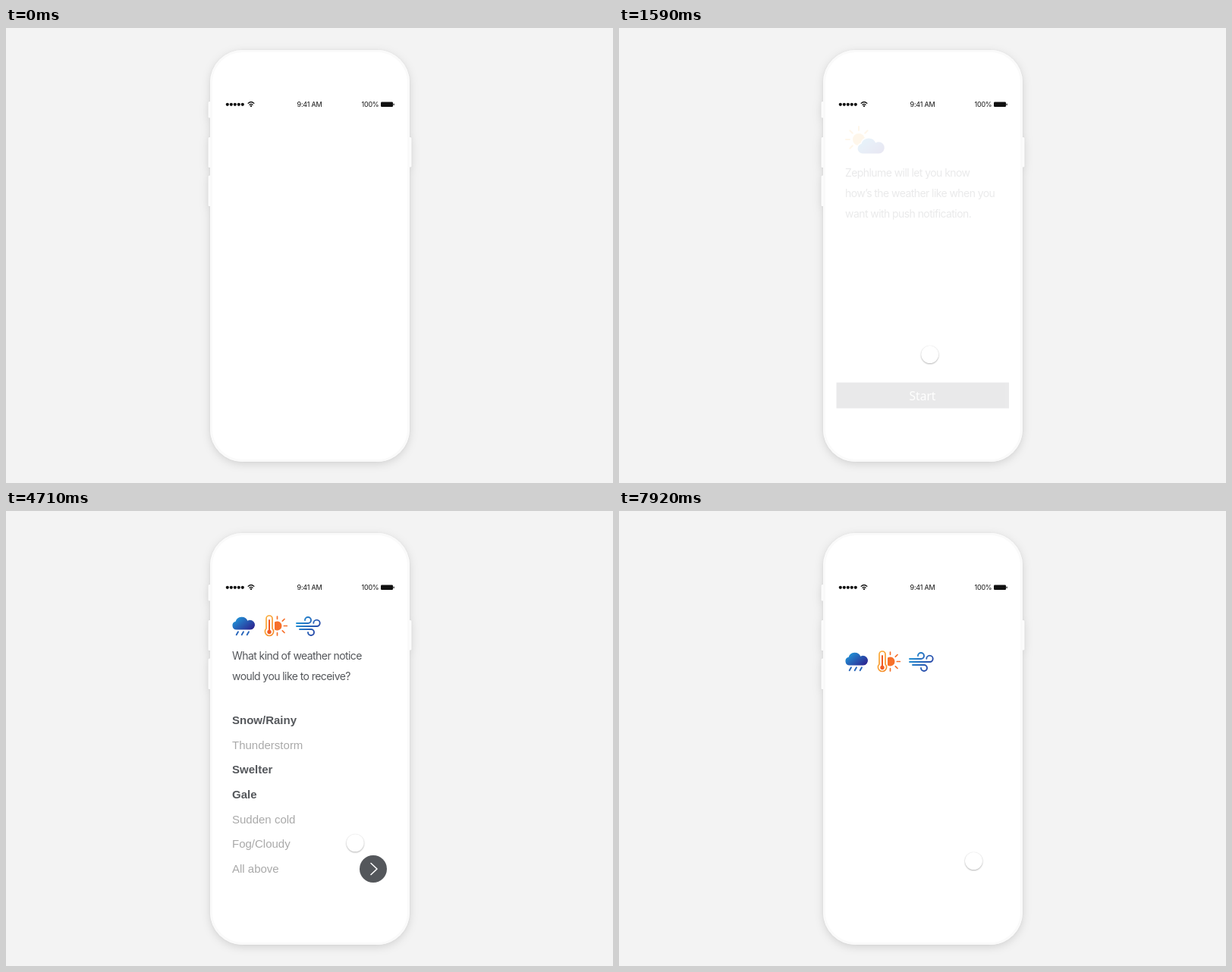
An HTML page that plays this animation: 800x600 px, repeating every 8000 ms.

```html
<!DOCTYPE html>
<html lang="en">
<head>
<meta charset="utf-8">
<title>Weather notice setup</title>
<style>
  html, body { margin: 0; width: 100%; height: 100%; overflow: hidden; background: #f3f3f3; }
  #stage { position: absolute; left: 0; top: 0; width: 800px; height: 600px; overflow: hidden; }
  svg { position: absolute; left: 0; top: 0; }
  text { fill: #34373c; font-family: Inter, sans-serif; }
  .status { font-size: 9px; letter-spacing: -.2px; fill: #111; }
  .copy { font-size: 14px; letter-spacing: -.57px; }
  .option { font: 15px "Liberation Sans", Arial, sans-serif; fill: #999; }
  .day, .dial { font-size: 15px; font-weight: 300; fill: #999; text-anchor: middle; }
  .dial { font-size: 14.5px; }
  .half { font-size: 14px; letter-spacing: -.4px; font-weight: 300; fill: #999; }
  .on { font-weight: 700; fill: #34373c; }
  .start { font: 15.5px "Noto Sans", "Open Sans", sans-serif; fill: #fff; text-anchor: middle; }
  .line { fill: none; stroke-linecap: round; stroke-linejoin: round; }
  #touch {
    position: absolute; left: -11.5px; top: -11.5px; width: 23px; height: 23px; border-radius: 50%;
    background: linear-gradient(rgba(255,255,255,.5), rgba(255,255,255,.32));
    box-shadow: 0 1px 2px rgba(0,0,0,.28), 0 0 1px rgba(0,0,0,.18);
  }
</style>
</head>
<body>
<div id="stage">
<svg width="800" height="600" viewBox="0 0 800 600">
  <defs>
    <linearGradient id="blue" x1="0" y1="0" x2="1" y2=".7">
      <stop offset="0" stop-color="#1fa5e2"/><stop offset="1" stop-color="#2c2a94"/>
    </linearGradient>
    <linearGradient id="breeze" gradientUnits="userSpaceOnUse" x1="383" y1="142" x2="414" y2="162">
      <stop offset="0" stop-color="#2197d8"/><stop offset="1" stop-color="#2b3a9f"/>
    </linearGradient>
    <linearGradient id="heat" x1="0" y1="0" x2="1" y2="1">
      <stop offset="0" stop-color="#fbb03b"/><stop offset="1" stop-color="#f58a2c"/>
    </linearGradient>
    <linearGradient id="fade" x1="0" y1="0" x2="0" y2="1">
      <stop offset="0" stop-color="#fff"/><stop offset=".3" stop-color="#fff" stop-opacity="0"/>
      <stop offset=".7" stop-color="#fff" stop-opacity="0"/><stop offset="1" stop-color="#fff"/>
    </linearGradient>
    <path id="cloud" d="M321 165.5a6.5 6.5 0 0 1-1.5-12.8a10 10 0 0 1 18.8-1.3a7.6 7.6 0 1 1 4 14.1z"/>
    <g id="next">
      <circle cx="484" cy="472" r="18" fill="#34373c"/>
      <path class="line" stroke="#fff" stroke-width="1.6" d="M481 464.5l8 7.5-8 7.5"/>
    </g>
  </defs>

  <g fill="#fcfcfc" style="filter:drop-shadow(0 3px 6px rgba(0,0,0,.13)) drop-shadow(0 0 1px rgba(0,0,0,.06))">
    <rect x="266.5" y="97" width="6" height="21.500" rx="1.5"/>
    <rect x="266.5" y="144" width="6" height="40" rx="1.5"/>
    <rect x="266.5" y="194.500" width="6" height="40.500" rx="1.5"/>
    <rect x="528.5" y="144" width="6" height="39.500" rx="1.5"/>
    <rect x="269" y="29" width="263" height="543" rx="43" fill="#fff"/>
  </g>
  <rect x="270.500" y="30.500" width="260" height="540" rx="41.500" fill="none" stroke="#fafafa" stroke-width="3"/>

  <g id="dots" fill="#111"></g>
  <g class="line" stroke="#111" stroke-width="1.3">
    <path d="M319.2 99.2q3.800-3.400 7.600 0M320.900 101.200q2.100-1.800 4.200 0"/>
    <circle cx="323" cy="102.900" r=".5"/>
  </g>
  <text class="status" x="400" y="104" text-anchor="middle">9:41 AM</text>
  <text class="status" x="491.500" y="104" text-anchor="end">100%</text>
  <rect x="494" y="97.500" width="16" height="6.500" rx="1.200" fill="#111"/>
  <rect x="510.500" y="99.500" width="1.200" height="2.500" rx=".5" fill="#111"/>

  <g id="welcome">
    <circle cx="316" cy="147" r="8" fill="#fbb03b"/>
    <path class="line" stroke="#fbb03b" stroke-width="2"
      d="M316 130v5M304.300 135.300l3.500 3.500M299 147h5M304.300 158.700l3.500-3.500M327.700 135.300l-3.500 3.500"/>
    <use href="#cloud" fill="#fff" stroke="#fff" stroke-width="3"/>
    <use href="#cloud" fill="url(#blue)"/>
    <text class="copy" x="298" y="196">Zephlume will let you know</text>
    <text class="copy" x="298" y="223">how’s the weather like when you</text>
    <text class="copy" x="298" y="250">want with push notification.</text>
    <rect x="286.500" y="467.500" width="227.500" height="34" fill="#34373c"/>
    <text class="start" x="400" y="491">Start</text>
  </g>

  <g id="kinds">
    <text class="copy" x="298" y="196">What kind of weather notice</text>
    <text class="copy" x="298" y="223">would you like to receive?</text>
    <g id="options"></g>
    <use id="kindsNext" href="#next"/>
  </g>

  <g id="schedule">
    <text class="copy" x="298" y="196">Now, choose the time you want</text>
    <text class="copy" x="298" y="223">to be notified.</text>
    <path stroke="#e2e2e2" d="M298 257.500h204M298 383.500h204M298 437.800h204"/>
    <g id="dials"></g>
    <rect x="296" y="273" width="92" height="93" fill="url(#fade)"/>
    <text class="half on" x="442.500" y="324.300">AM</text>
    <text class="half" x="472" y="324">|</text>
    <text class="half" x="481.500" y="324.300">PM</text>
    <g id="days"></g>
    <g class="line" stroke="#34373c" stroke-width="1.6">
      <circle cx="316" cy="472" r="17.200"/>
      <path d="M319 464.500l-8 7.500 8 7.500"/>
    </g>
    <use id="scheduleNext" href="#next"/>
  </g>

  <g id="icons">
    <g>
      <use href="#cloud" fill="url(#blue)" transform="translate(34.200 17.600) scale(.84)"/>
      <path class="line" stroke="#2866bb" stroke-width="1.900" d="M306 159.300l-2.300 4M313 159.300l-2.300 4M320 159.300l-2.300 4"/>
    </g>
    <g>
      <path class="line" stroke="url(#heat)" stroke-width="1.700" d="M343 155v-13a4 4 0 0 1 8 0v13a5.600 5.600 0 1 1-8 0z"/>
      <path class="line" stroke="#f15a24" stroke-width="2" d="M347 144v14"/>
      <circle cx="347" cy="159.500" r="2.700" fill="#f15a24"/>
      <path fill="#f7702a" d="M354 146.600a6 6 0 1 1 0 9.800z"/>
      <path class="line" stroke="#f7702a" stroke-width="1.700"
        d="M357.500 139v3.300M367 142.500l-2.700 2.700M366.300 151.500h4M367 160.500l-2.700-2.700M357.500 160.700v3.300"/>
    </g>
    <path class="line" stroke="url(#breeze)" stroke-width="1.900"
      d="M383 148h15a4 4 0 1 0-4-4M383 152h26.500a4.200 4.200 0 1 0-4.200-4.200M387 156h15a4 4 0 1 1-4 4"/>
  </g>
</svg>
<div id="touch"></div>
</div>

<script>
const LOOP = 8000, STEP = 30, LAST = 7920;
const $ = id => document.getElementById(id);
const clamp = v => Math.min(1, Math.max(0, v));
const progress = (t, from, length) => clamp((t - from) / length);

const linear = p => p;
const outQuad = p => 1 - (1 - p) ** 2;
const inOut = power => p => p < .5 ? (2 * p) ** power / 2 : 1 - (2 - 2 * p) ** power / 2;
const quad = inOut(2), cubic = inOut(3);

function add(parent, tag, attrs, content = '') {
  const el = document.createElementNS('http://www.w3.org/2000/svg', tag);
  for (const name in attrs) el.setAttribute(name, attrs[name]);
  el.textContent = content;
  $(parent).append(el);
  return el;
}

for (let i = 0; i < 5; i++) add('dots', 'circle', { cx: 291.8 + i * 5, cy: 100.8, r: 2.1 });

const options = ['Snow/Rainy', 'Thunderstorm', 'Swelter', 'Gale', 'Sudden cold', 'Fog/Cloudy', 'All above']
  .map((label, i) => add('options', 'text', { class: 'option', x: 298, y: 280.8 + i * 32.7 }, label));

const dayCentres = [305, 335.5, 368, 401.5, 433, 464, 495.5];
const days = [...'MTWTFSS']
  .map((label, i) => add('days', 'text', { class: 'day', x: dayCentres[i], y: 415.3 }, label));

function addDial(x, values) {
  values.forEach((value, i) =>
    add('dials', 'text', { class: i === 2 ? 'dial on' : 'dial', x, y: 289 + i * 17.8 }, value));
}
addDial(308, ['07', '08', '09', '10', '11']);
addDial(374, ['50', '55', '00', '05', '10']);

// Selected item, time of the tap
const picks = [
  [options[0], 2850], [options[2], 3240], [options[3], 3660],
  [days[0], 6060], [days[1], 6360], [days[3], 6720],
];
const iconTimes = [2850, 3240, 3660];

// Page, fade-in start, fade-out start, rise in px
const pages = [
  ['welcome', 240, 1300, 0],
  ['kinds', 1890, 4570, 4],
  ['schedule', 5160, 7400, 4],
];

// Start, length, x, y, easing
const moves = [
  [720, 320, 419, 482, quad],
  [1230, 420, 409, 429, outQuad],
  [1950, 720, 339, 279, quad],
  [2880, 310, 336, 343, quad],
  [3300, 300, 322, 376, quad],
  [3750, 660, 486, 477, quad],
  [4500, 420, 451, 424, outQuad],
  [5220, 720, 305, 411, quad],
  [6090, 240, 335.5, 410, quad],
  [6390, 300, 402, 410, quad],
  [6870, 520, 486, 477, outQuad],
  [7500, 420, 467, 461, quad],
];

function touchAt(t) {
  let x = 490, y = 425;
  for (const [from, length, toX, toY, ease] of moves) {
    const p = ease(progress(t, from, length));
    x += (toX - x) * p;
    y += (toY - y) * p;
  }
  return [x, y];
}

function render(t) {
  for (const [id, enter, leave, rise] of pages) {
    const shown = quad(progress(t, enter, 540));
    const page = $(id);
    page.style.opacity = shown * (1 - cubic(progress(t, leave, 410)));
    page.setAttribute('transform', `translate(0 ${rise * (1 - shown)})`);
  }
  for (const [el, time] of picks) el.classList.toggle('on', t >= time);
  $('kindsNext').style.opacity = linear(progress(t, 2850, 200));
  $('scheduleNext').style.opacity = linear(progress(t, 6060, 200));

  [...$('icons').children].forEach((icon, i) => {
    const p = quad(progress(t, iconTimes[i], 530));
    icon.style.opacity = p;
    icon.setAttribute('transform', `translate(${10 * (1 - p)} 0)`);
  });
  $('icons').setAttribute('transform', `translate(0 ${47 * quad(progress(t, 7380, 540))})`);

  const [x, y] = touchAt(t);
  $('touch').style.transform = `translate(${x}px, ${y}px)`;
  $('touch').style.opacity = progress(t, 720, 200);
}

const begin = performance.now();
function tick() {
  const t = (performance.now() - begin) % LOOP;
  render(Math.min(LAST, Math.floor(t / STEP) * STEP));
  requestAnimationFrame(tick);
}
tick();
</script>
</body>
</html>
```
